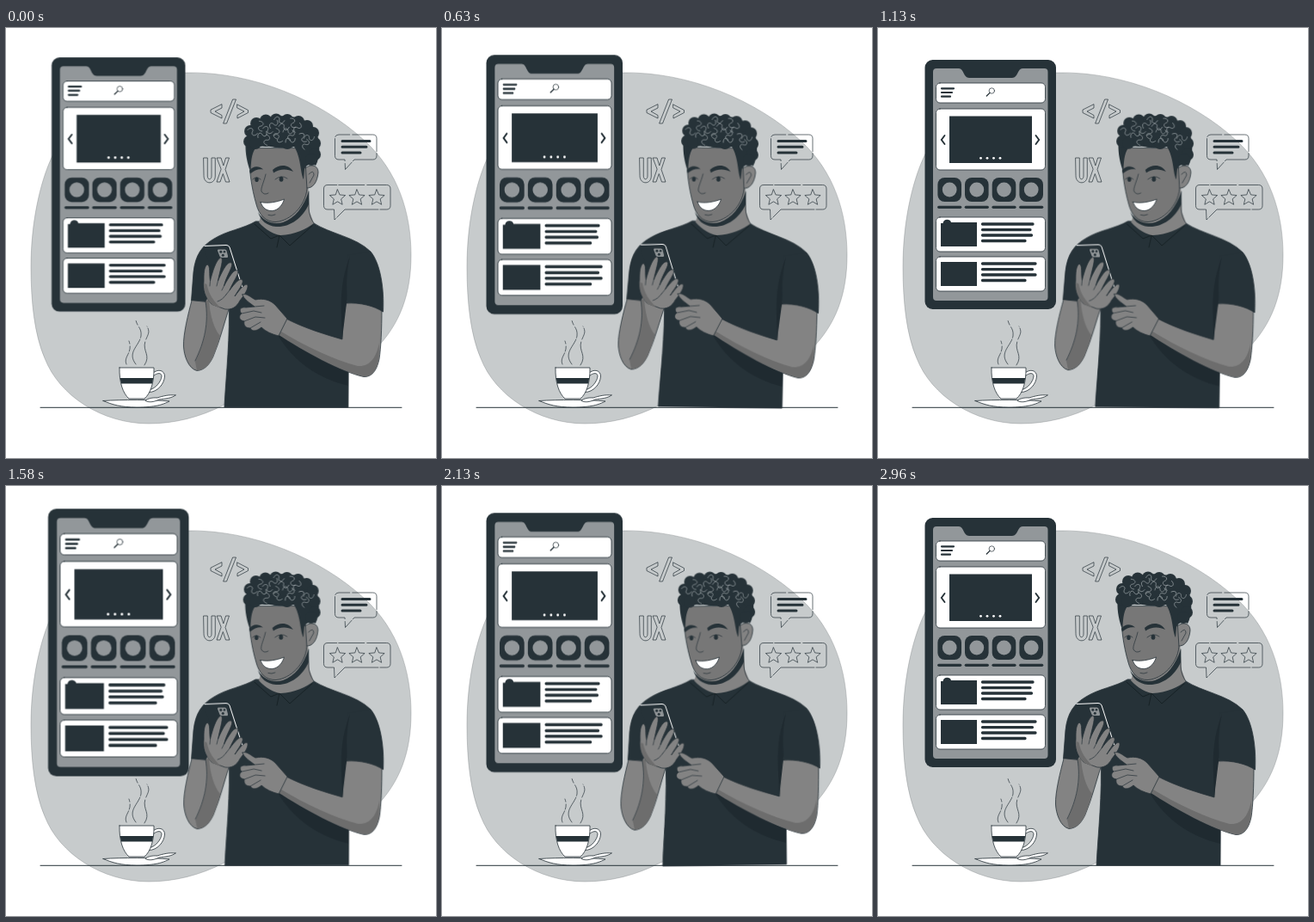
Animation, 500 px wide and 500 px high, one loop 3000 ms. Source, as an HTML page:

```html
<!DOCTYPE html>
<html lang="en">
<head>
<meta charset="utf-8">
<title>Mobile interface</title>
<style>
html, body { margin: 0; width: 100%; height: 100%; overflow: hidden; background: #fff; }
svg { display: block; width: 100vw; height: 100vh; }
.ink { fill: #263238; }
.paper { fill: #fff; }
.skin { fill: #838383; }
.shade { fill: #6d6d6d; }
.line { fill: none; stroke: #263238; stroke-width: .7; stroke-linecap: round; stroke-linejoin: round; }
.edge { stroke: #263238; stroke-width: .8; stroke-linejoin: round; stroke-linecap: round; }
.fold { fill: none; stroke: #111a1e; stroke-width: .7; stroke-linecap: round; stroke-linejoin: round; }
.bar { fill: none; stroke: #263238; stroke-linecap: round; }
#phone { transform-origin: 130.7px 182px; }
#man { transform-origin: 323px 270.5px; }
</style>
</head>
<body>
<svg viewBox="0 0 500 500">
  <path fill="#c7cbcc" stroke="#7f8587" stroke-width=".4" d="M208 52C286 50 366 84 417 131C456 167 471 215 471 264C471 308 459 344 429 374C390 404 320 412 254 438C225 453 195 460 166 460C112 460 62 428 45 384C33 356 29 318 29 278C29 225 40 180 52 153C80 90 140 52 208 52Z"/>

  <g class="line">
    <path d="M251 89V93L243 97L251 101.5V105L238 98.5V95.5ZM264 83H267.5L256.5 111H253ZM269 89L281.5 95.5V98.5L269 105V101.5L277 97L269 93Z"/>
    <path d="M230 151H234.3V172C234.3 177 239 177 239 172V151H243.3V172C243.3 182.5 230 182.5 230 172ZM245.5 151H250L252.8 160L255.6 151H259.5L255 164.5L260 179H255.5L252.3 169.5L249 179H245L250 164.5Z"/>
    <path stroke-dasharray="34 2 18 3 46 2" d="M394 153H387Q382.5 153 382.5 148.5V128.500Q382.5 124 387 124H426.500Q431 124 431 128.5V148.500Q431 153 426.5 153H405L394.5 164.5Z"/>
    <path stroke-dasharray="52 2 30 3 64 2" d="M381.5 211H374Q369.5 211 369.5 206.5V187Q369.5 182.5 374 182.5H442.500Q447 182.5 447 187V206.500Q447 211 442.5 211H394L382 223Z"/>
    <g id="stars"></g>
  </g>
  <path class="bar" stroke-width="3" d="M391 131.5H423M391 138.3H419M391 145H412"/>

  <path class="bar" d="M40 441.3H460"/>

  <g id="cup">
    <path class="line" stroke-dasharray="14 2 6 3 19 2" d="M140 391C136 382 148 378 143 364"/>
    <path class="line" stroke-dasharray="32 2 13 3 5 3" d="M151 391C140 377 155 370 157 358C158 349 153 348 151 340"/>
    <path class="line" stroke-dasharray="28 3 14 2 4 3" d="M161 392C169 380 158 376 162 364C165 356 168 354 164 347"/>
    <path class="paper edge" d="M113 433.5C135 432 170 432 190 434C182 438 174 441 152 441C133 441 124 438 113 433.5Z"/>
    <path class="paper edge" d="M171 401C177 396 184.500 398 184.500 405C184 414 176 423.500 166 423.500L167.500 420.500C174 419 180.500 411 181 405C181 400 175 401 171 405Z"/>
    <path class="paper edge" d="M132 395H172C172.5 412 168 425 161 431H143C136 425 131.5 412 132 395Z"/>
    <path class="ink" d="M132.5 407H171.300L170 413.5H134Z"/>
    <path class="paper edge" d="M197 427C190 426 182 428 176 430C170 429.500 164 431 162 433.500C167 436 173 434.500 178 432C185 431 193 430.500 197 427Z"/>
  </g>

  <g id="phone">
    <rect class="ink" x="54.5" y="37" width="152.5" height="290" rx="9"/>
    <path fill="#92979a" d="M68 47H94C100 47 99 58 106 58H156C163 58 162 47 168 47H193.500Q197.5 47 197.5 51V313Q197.5 317 193.5 317H68Q64 317 64 313V51Q64 47 68 47Z"/>
    <g id="panels" class="paper edge"></g>
    <path class="bar" stroke-width="2.2" d="M74 70.3H88M74 75H86M74 79.7H84"/>
    <g class="line"><circle cx="132.3" cy="73" r="3.2"/><path d="M130 75.4L126.3 79" stroke-width="1.3"/></g>
    <path class="ink" d="M83 102.5H179V157H83Z"/>
    <g id="dots" class="paper"></g>
    <path class="bar" stroke-width="1.9" d="M77.5 125L73.8 130L77.5 135M183.5 125L187.2 130L183.5 135"/>
    <g id="icons"></g>
    <path class="ink" d="M73 227H75.500C76 221.5 84 221.5 85 226H115V254H73ZM73 272H115V300H73Z"/>
    <path class="bar" stroke-width="3.3" d="M121.5 228H180M121.5 234.6H177M121.5 241H178.5M121.5 247.5H171M121.5 274H183M121.5 280.6H179.5M121.5 287H183M121.5 293.5H171"/>
  </g>

  <g id="man">
    <!-- shirt -->
    <path class="ink edge" d="M290 225C277 233 256 236 242 245C228 253 220 264 218 284L215.5 317L247 323L259 315C261 358 256 402 254 441H398L398.500 340L424 260C407 243 376 239 358 227Z"/>
    <path fill="#1f2a30" d="M316 357L398 380V416C364 408 334 388 316 357Z"/>
    <path class="fold" d="M289 228L308 245L318 241L330 253L356 230M318 241L315 255M250 266Q243 277 242 290M259 315Q261 302 255 288"/>

    <!-- far arm -->
    <path class="skin edge" d="M396 316L437 326C437 350 436 372 434 385C431 399 425 406 416 405.500C390 400 347 376 316 356L324 337C346 349 374 357 391 362C391 346 393 332 396 316Z"/>
    <path class="shade" d="M434 366C431 382 424 394 409 393C382 386 348 370 320 353L316 356C347 376 390 400 416 405C425 406 431 398 433.5 385Z"/>
    <path class="ink edge" d="M398 264L424 260C435 273 440 302 438.500 330C428 323 412 319 396 320Z"/>
    <path fill="#1f2a30" d="M391 361C391 332 385 304 400 265C393 298 398 306 396 320Z"/>

    <!-- near arm -->
    <path class="skin edge" d="M216 317C212 332 206 356 206.5 370C207 381 212 396 222 398.500C231 398 237 391 241 382C249 363 254 342 260 324L238 306L232 318Z"/>
    <path class="shade" d="M232 318C237 342 231 366 220 388L222 398C231 398 237 391 241 382C244 374 247 366 249 358C242 350 237 334 236 316Z"/>
    <path class="line" d="M232 318C236 342 231 365 220 387"/>

    <!-- handset -->
    <path class="ink" d="M231 253.500Q229 253.5 230 256L250 311Q252 315 256 314L273 306Q276 305 275 302L260 255Q259 252.5 256 252.500Z"/>
    <path fill="none" stroke="#fff" stroke-linecap="round" d="M231 253.500L256 252.500Q259 252.5 260 255L275 302"/>
    <path fill="#8f9496" d="M247 257.500H254.500Q256 257.5 256.5 259L258 265Q258.500 267 257 267H250.500Q249 267 248.500 265.500L246 259Q245.500 257.5 247 257.500Z"/>
    <g class="ink"><circle cx="249.8" cy="260.2" r="1.5"/><circle cx="254" cy="260.2" r="1.3"/><circle cx="252.3" cy="264.3" r="1.5"/></g>

    <!-- holding hand -->
    <path class="skin edge" d="M239 321C232 313 229 304 230 294C230 286 230 278 234 275C238 276 236 287 237.500 294C240 284 244 270 249.500 267C254 267 249 281 246.500 294C251 284 257 271 262 273C265.500 276 256 288 253.500 300C259 290 265 280 269 282C272 285 264 295 260 305C266 297 272 290 275 293C277 297 269 306 266 312C272 304 278 296 281 299C282 304 276 312 272 317C268 325 262 328 255 327Z"/>
    <path class="line" d="M237.5 294L237 300M246.5 294L245 300M253.5 300L251 305M260 305L256 310M246 318Q252 316 256 310"/>
    <path class="shade" d="M230.5 297C229 307 234 316 240 322L250 326C241 317 236 310 233.500 298Z"/>

    <!-- pointing hand -->
    <path class="skin edge" d="M275 310C280 308 284 313 290 316C299 314 307 316 313 322L327 338L317 358C309 356 302 353 297 348C291 353 286 353 284 349C279 349 276 346 277 341C271 340 270 335 274 332C270 328 273 324 279 325L289 324C284 320 276 315 275 310Z"/>
    <path class="line" d="M274 332L288 329L297 331M277 341L290 336L301 337M284 349L296 342M289 324L300 323"/>

    <!-- head -->
    <path class="skin" d="M298 214L294 226C302 235 312 240 319 241C336 240 349 234 358 227L353 214L351 180Z"/>
    <path class="ink" d="M293 214C299 225 311 229 322 226C336 221 346 208 352 190V205C345 221 330 232 314 231C303 230 296 224 293 214Z"/>
    <path class="line" d="M352 190V210Q353 221 358 227"/>
    <path class="skin edge" d="M347 164C352 158 363 158 363 168C362 179 357 187 349 186Z"/>
    <path class="line" d="M352 170Q358 164 358 171L353 180"/>
    <path fill="#777" class="edge" d="M284 140C281 161 286 188 291 205C294 217 302 226 314 225.500C331 224 348 207 350 187L347 140Z"/>
    <path class="ink" d="M283 166C287 160 294 160 299 164.500C294 163.500 289 165 284 169.500ZM310 165C318 157.500 329 158.500 334 167C327 163.500 318 163.500 311 168.500Z"/>
    <path class="line" stroke-width="1.2" d="M287 176Q291 171.5 296 176M313 176Q320 170 327 175M302 170C300 179 296 186 297 190Q300 195 305 192"/>
    <g class="ink"><ellipse cx="291.5" cy="176.3" rx="2.2" ry="2.8"/><ellipse cx="320" cy="175.8" rx="2.4" ry="3"/></g>
    <path class="paper edge" d="M296 202.500C304 204.500 315 202.500 323.500 199C321 208 314 213.500 307 212.500C301 211.500 298 208 296 202.500Z"/>
    <path class="line" d="M305 217.500Q309 219 313 217"/>
    <path class="ink" d="M283 164C276 142 276 118 292 109C310 99 344 100 355 114C367 124 366 150 360 160C355 156 349 159 347 164L346 176C342 168 343 150 335 138C318 143 300 133 290 140C285 146 285 158 284.500 164Z"/>
    <g id="bumps" class="ink"></g>
    <g id="curls" fill="none" stroke="#a3abae" stroke-width=".65" stroke-linecap="round"></g>
  </g>
</svg>
<script>
const $ = id => document.getElementById(id);
const fill = (id, list, draw) => { $(id).innerHTML = list.map(draw).join(''); };
const circle = (x, y, r) => `<circle cx="${x}" cy="${y}" r="${r}"/>`;

fill('panels', [[64, 23], [94, 71], [220, 40], [266, 40]], ([y, h]) =>
  `<rect x="67.5" y="${y}" width="127" height="${h}" rx="4.5"/>`);

fill('dots', [119.5, 127, 134.5, 142], x => circle(x, 151.3, 1.4));

fill('icons', [83.2, 114.8, 146.5, 178.2], x =>
  `<rect class="ink" x="${x - 13.8}" y="174" width="27.6" height="28" rx="8"/>
   <circle cx="${x}" cy="188" r="8.4" fill="#92979a"/>
   <path class="bar" stroke-width="3.2" d="M${x - 12.5} 208.3h25"/>`);

fill('stars', [385.5, 408, 431], x => {
  const points = Array.from({ length: 10 }, (_, i) => {
    const r = i % 2 ? 4.4 : 9.6, a = (i / 5 - 0.5) * Math.PI;
    return `${x + r * Math.cos(a)},${197.5 + r * Math.sin(a)}`;
  });
  return `<polygon points="${points.join(' ')}"/>`;
});

fill('bumps', [
  [284, 120], [283, 132], [291, 111], [302, 107.5], [314, 106.5], [327, 107],
  [340, 109], [350, 114], [357, 122], [359, 134], [359, 147], [355, 153],
  [290, 134], [302, 131], [314, 132], [327, 134]
], ([x, y]) => circle(x, y, 7));

// Loose waves spread over the hair on a sunflower spiral.
fill('curls', Array.from({ length: 18 }, (_, i) => i), i => {
  const r = Math.sqrt((i + 0.5) / 18), a = i * 2.4;
  const x = 322 + 36 * r * Math.cos(a);
  const y = 120 + 14 * r * Math.sin(a) + Math.max(0, x - 340) * 0.8;
  return `<path transform="translate(${x} ${y}) rotate(${i * 97})" d="M-6 1C-5 -5 0 -4 0 0S5 4 6 -1"/>`;
});

const loop = (id, duration, steps, toTransform) =>
  $(id).animate(
    steps.map(([offset, value]) => ({ offset, transform: toTransform(value) })),
    { duration, iterations: Infinity, delay: -28, easing: 'linear' }
  );

// Double heartbeat, then a rest.
loop('phone', 1500,
  [[0, 1], [0.1, 1.1], [0.3, 1], [0.4, 1], [0.5, 1.1], [0.6, 1], [1, 1]],
  v => `scale(${v})`);

// Gentle sway.
loop('man', 3000,
  [[0, 0], [0.25, 1], [0.75, -1], [1, 0]],
  v => `rotate(${v}deg)`);
</script>
</body>
</html>
```
